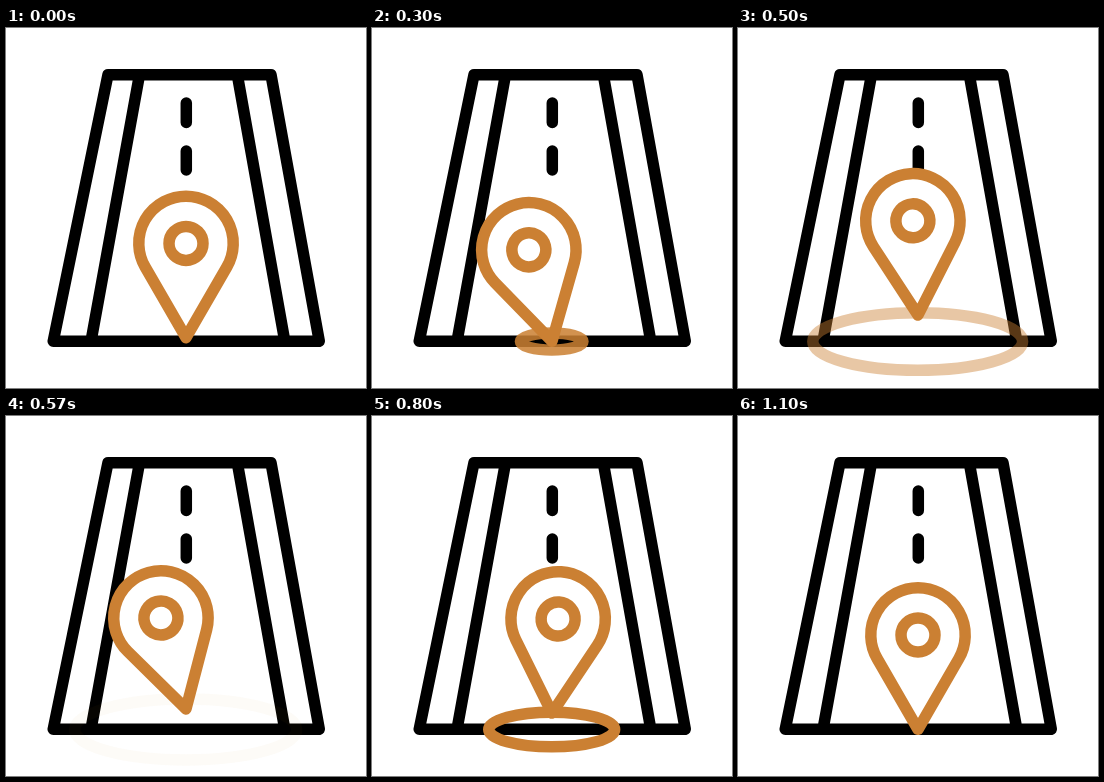
Recreate the animation shown at these times as an HTML page. Size 360 by 360 pixels, loop 1670 ms.

```html
<!DOCTYPE html>
<html lang="en">
<head>
<meta charset="utf-8">
<title>Road pin</title>
<style>
  html, body { margin: 0; height: 100%; overflow: hidden; background: #fff; }
  svg { display: block; width: 100%; height: 100%; }
</style>
</head>
<body>
<svg viewBox="0 0 360 360" fill="none" stroke="#000" stroke-width="11.5" stroke-linecap="round" stroke-linejoin="round">
  <path d="M102 46.7H265L313.3 313.3H47.2ZM133.5 46.7L85 313.3M231.3 46.7L278.8 313.3M180.3 75V94.5M180.3 123V142"/>
  <g stroke="#cb8033">
    <ellipse class="ring" cx="179.7" cy="313.5"/>
    <ellipse class="ring" cx="179.7" cy="313.5"/>
    <g id="pin">
      <path d="M180 313.3L139.1 242.5A47.2 47.2 0 1 1 220.9 242.5Z"/>
      <circle cx="180" cy="219" r="17"/>
    </g>
  </g>
</svg>
<script>
const LOOP = 1670, STEP = 100 / 3, BEAT = 4 * STEP;
const pin = document.getElementById('pin');
const rings = document.querySelectorAll('.ring');

const landings = [-10, 300, 670, 1015];
const swings = [0, 14, -14.2, 9.2, -15.4, 5, 3.5, -5.3, 0]; // degrees, one per beat

const clamp = p => Math.min(1, Math.max(0, p));
const smooth = p => (1 - Math.cos(Math.PI * clamp(p))) / 2;

// Each hop is a half sine, lower than the one before.
function lift(t) {
  const next = landings.findIndex(end => t < end);
  if (next < 0) return 0;
  const from = landings[next - 1];
  return (44.5 - 9 * next) * Math.sin(Math.PI * (t - from) / (landings[next] - from));
}

function tilt(t) {
  const beat = clamp((t - STEP) / BEAT / 8) * 8;
  const i = Math.min(7, Math.floor(beat));
  return swings[i] + (swings[i + 1] - swings[i]) * smooth(beat - i);
}

function draw(now) {
  const t = Math.floor((now % LOOP + 4) / STEP) * STEP % LOOP;
  pin.setAttribute('transform', `translate(0 ${-lift(t)}) rotate(${tilt(t)} 180 313.3)`);
  rings.forEach((ring, i) => {
    const age = t - 240 - i * 13 * STEP;
    const size = Math.sin(Math.PI / 2 * clamp(age / 330));
    ring.setAttribute('rx', 111 * size);
    ring.setAttribute('ry', 30.5 * size);
    ring.setAttribute('opacity', clamp(age / 70) * (1 - smooth((age - 155) / 195)));
  });
}

let start;
function tick(now) {
  start ??= now;
  draw(now - start);
  requestAnimationFrame(tick);
}
draw(0);
requestAnimationFrame(tick);
</script>
</body>
</html>
```
